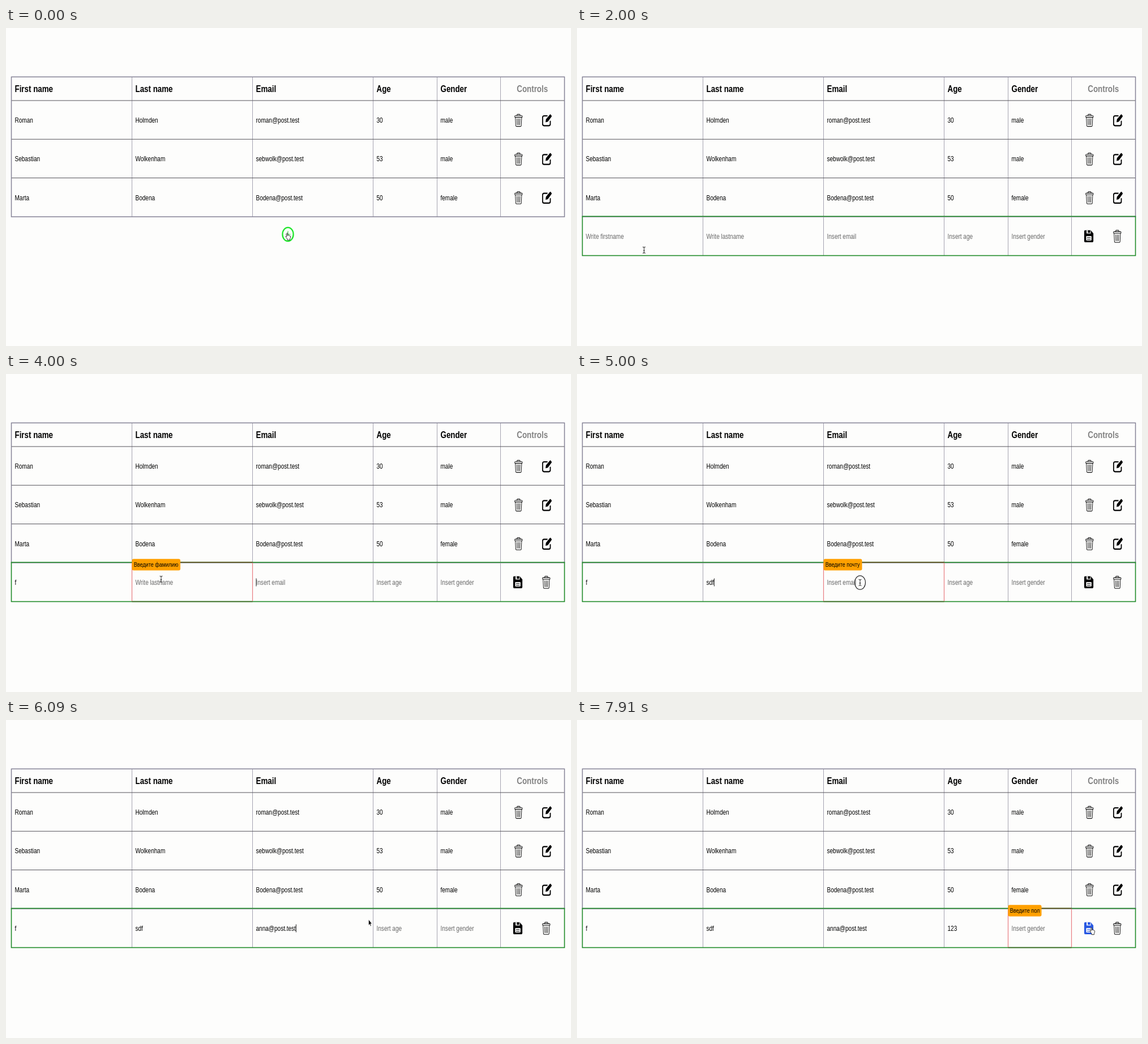
An HTML page that plays this animation: 998x561 px, repeating every 8000 ms.

```html
<!DOCTYPE html>
<html lang="en">
<head>
<meta charset="utf-8">
<title>Editable table</title>
<style>
html, body { margin: 0; width: 100%; height: 100%; overflow: hidden; background: #fdfdfc; }
svg { display: block; width: 998px; height: 561px; font: 12.4px "Liberation Sans", Arial, sans-serif; }
.head { font-size: 16.5px; font-weight: bold; }
.tip { font-size: 11.2px; }
.hint { fill: #686868; }
</style>
</head>
<body>
<svg id="stage" viewBox="0 0 998 561" xmlns="http://www.w3.org/2000/svg">
  <defs>
    <g id="trash" fill="none" stroke="#111" stroke-width="1.15">
      <path d="M-3.5-8.3v-1.2q0-1.2 1.2-1.2h4.6q1.2 0 1.2 1.2v1.2"/>
      <rect x="-8.2" y="-8.3" width="16.4" height="2.9" rx="1"/>
      <path d="M-6.9-5.4L-6.1 9q.1 1.6 1.7 1.6h8.8q1.6 0 1.7-1.6L6.9-5.4M-3.2-3.2L-2.8 8.2M0-3.2V8.2M3.2-3.2L2.8 8.2"/>
    </g>
    <g id="pen">
      <path d="M1.5-7.7H-6q-3.2 0-3.2 3.2V6.4q0 3.2 3.2 3.2H4.4q3.2 0 3.2-3.2V1" fill="none" stroke="#000" stroke-width="2.2"/>
      <path d="M-2.8 3.6l.9-5.2L6.6-10q1-1 2 0l1.6 1.7q1 1 0 2L2.3 2.6z"/>
    </g>
    <g id="save">
      <path d="M-8-10.5H4.4L10-4.8V8.4q0 2.2-2.2 2.2H-7.8q-2.2 0-2.2-2.2V-8.3q0-2.2 2-2.2z"/>
      <path d="M-4.8-10.6h2.5v4.5h5.6v-4.5h1.2v5.8h-9.3zM-4.7-.2h9.6q1 0 1 1v5.7q0 1-1 1h-9.6q-1 0-1-1V.8q0-1 1-1z" fill="#fdfdfc"/>
      <path d="M-3.6 1.8h7.4v1H-3.6zM-3.6 4.6h7.4v1H-3.6z"/>
    </g>
    <path id="ibeam" d="M-3-5.5q2.2 0 3 1.2.8-1.2 3-1.2M0-4.3V4.3M-3 5.5q2.2 0 3-1.2.8 1.2 3 1.2M-1.6.9h3.2" fill="none" stroke="#222" stroke-width="1.1"/>
    <path id="arrow" d="M0-5v10.2l2.4-2.1 1.6 3.6 1.7-.8-1.6-3.4h3.2z" fill="#000" stroke="#fff" stroke-width=".6"/>
    <path id="hand" d="M-2.6-3.2q0-1.3 1.1-1.3T-.4-3.2V.2l.5-.9q1.5-.4 1.9.8 1.4-.5 1.9.7 1.6-.3 1.7 1.2 0 2.6-1.4 4.2v1.9H-1.2V6.4L-4.8 2.3q-.5-1.4 1-1.3l1.2 1z" fill="#fff" stroke="#222" stroke-width="1"/>
  </defs>
  <g id="table"></g>
  <g id="plus"></g>
  <g id="row"></g>
  <g id="pointer"><ellipse id="ring" rx="9.5" ry="12.2" fill="none" stroke="#222" stroke-width="1.2"/><use id="cursor"/></g>
</svg>
<script>
const FPS = 11, LOOP = 8000, SQUEEZE = 0.81;
const $ = id => document.getElementById(id);
const at = (x, y) => `transform="translate(${x} ${y}) scale(${SQUEEZE} 1)"`;
const text = (x, y, s, extra = '') => `<text ${at(x, y)} ${extra}>${s}</text>`;
const icon = (id, x, y) => `<use href="#${id}" ${at(x, y)}/>`;
const line = (x1, y1, x2, y2, color, w = 1) =>
  `<path d="M${x1} ${y1}L${x2} ${y2}" stroke="${color}" stroke-width="${w}"/>`;
const show = (el, on) => el.setAttribute('visibility', on ? 'visible' : 'hidden');

const LEFT = 9.5, RIGHT = 986.5, TOP = 86.3, BOTTOM = 333, ROW_END = 401.5;
const edges = [LEFT, 222.5, 435.5, 648.5, 761.5, 873.5];
const textX = edges.map(x => x + 6);
const heads = ['First name', 'Last name', 'Email', 'Age', 'Gender'];
const people = [
  ['Roman', 'Holmden', 'roman@post.test', '30', 'male'],
  ['Sebastian', 'Wolkenham', 'sebwolk@post.test', '53', 'male'],
  ['Marta', 'Bodena', 'Bodena@post.test', '50', 'female']
];
const hints = ['Write firstname', 'Write lastname', 'Insert email', 'Insert age', 'Insert gender'];

// Field values: [step, field, value]
const typed = [
  [25, 0, 'f'], [49, 1, 's'], [50, 1, 'sd'], [51, 1, 'sdf'],
  [63, 2, 'anna@post.test'], [73, 3, '1'], [74, 3, '12'], [75, 3, '123']
];
// Focused field: [step, field]
const focus = [[12, 0], [33, 1], [40, 2], [46, 1], [56, 2], [71, 3], [79, 4], [86, -1]];
// Warnings: field, first step, end step, width, message
const tips = [
  [1, 40, 49, 85.5, 'Введите фамилию'],
  [2, 46, 63, 68, 'Введите почту'],
  [4, 86, 88, 59, 'Введите пол']
];
const clicks = [2, 12, 32, 39, 46, 54, 55, 70, 78, 85];
// Pointer path: step, x, y, shape
const path = [
  [0, 498, 366, 'hand'], [3, 498, 366, 'ibeam'], [5, 470, 367, 'ibeam'], [11, 114, 369, 'ibeam'],
  [16, 112, 371, 'ibeam'], [21, 118, 392, 'ibeam'], [26, 122, 390, 'ibeam'], [32, 238, 382, 'ibeam'],
  [34, 242, 382, 'ibeam'], [39, 466, 375, 'ibeam'], [41, 455, 372, 'ibeam'], [44, 274, 362, 'ibeam'],
  [46, 268, 365, 'ibeam'], [51, 272, 366, 'ibeam'], [54, 500, 368, 'ibeam'], [56, 500, 368, 'ibeam'],
  [60, 506, 388, 'ibeam'], [63, 508, 388, 'ibeam'], [67, 640.5, 357, 'arrow'], [68, 662, 361, 'ibeam'],
  [70, 690, 370, 'ibeam'], [75, 694, 370, 'ibeam'], [78, 810, 370, 'ibeam'], [81, 814, 370, 'ibeam'],
  [84, 904, 370, 'hand'], [87, 910, 370.5, 'hand']
];
const REST_ROW = 3;

function buildTable() {
  let s = '';
  heads.forEach((h, i) => s += text(textX[i], 113, h, 'class="head"'));
  s += text(929.7, 113, 'Controls', 'class="head" text-anchor="middle" fill="#828282"');
  people.forEach((p, r) => {
    const y = 162.7 + r * 68.3;
    p.forEach((v, i) => s += text(textX[i], y + 4.4, v));
    s += icon('trash', 905.3, y + .3) + icon('pen', 955.3, y);
  });
  edges.slice(1).forEach(x => s += line(x, TOP, x, BOTTOM, '#a5a3b1'));
  [128, 196.2, 264.5].forEach(y => s += line(LEFT, y, RIGHT, y, '#55535a', 1.1));
  s += `<rect x="${LEFT}" y="${TOP}" width="${RIGHT - LEFT}" height="${BOTTOM - TOP}" fill="none" stroke="#858296" stroke-width="1.5"/>`;
  $('table').innerHTML = s;
  $('plus').innerHTML = '<ellipse cx="498" cy="364" rx="9.6" ry="12.2" fill="none" stroke="#20e62c" stroke-width="2.3"/>' +
    line(493.5, 364, 502.5, 364, '#5fdc66', 1.3) + line(498, 358, 498, 370, '#5fdc66', 1.3);
}

function buildRow() {
  let s = '';
  edges.slice(1).forEach(x => s += line(x, 333, x, 401, '#a5a3b1'));
  s += `<rect x="${LEFT}" y="332.3" width="${RIGHT - LEFT}" height="${ROW_END - 332.3}" fill="none" stroke="#1f8b28" stroke-width="1.6"/>`;
  hints.forEach((h, i) => s += text(textX[i], 371.9, h, `id="field${i}"`));
  s += `<g id="disk">${icon('save', 904, 367.3)}</g>` + icon('trash', 954.3, 367.6);
  tips.forEach(([i, , , w, msg], n) => {
    const x = edges[i], end = edges[i + 1];
    s += `<g id="tip${n}">` + line(x, 333, x, 401, '#e87c80', 1.2) + line(end, 333, end, 401, '#e87c80', 1.2) +
      line(x, 332.3, end, 332.3, '#65501a', 1.6) + line(x, ROW_END, end, ROW_END, '#39651d', 1.5) +
      `<rect x="${x}" y="326.3" width="${w}" height="20.2" rx="3" fill="#ffa000"/>` +
      text(x + 3.2, 340.4, msg, 'class="tip"') + '</g>';
  });
  s += '<path id="caret" stroke="#222" stroke-width="1"/>';
  $('row').innerHTML = s;
}

const last = (list, step) => list.filter(e => e[0] <= step).pop();

function drawFields(step) {
  hints.forEach((h, i) => {
    const entry = last(typed.filter(e => e[1] === i), step), el = $('field' + i);
    el.textContent = entry ? entry[2] : h;
    el.setAttribute('class', entry ? '' : 'hint');
  });
  tips.forEach(([, from, to], n) => $('tip' + n).setAttribute('display', step >= from && step < to ? 'inline' : 'none'));
  $('disk').setAttribute('fill', step >= 84 ? '#2858e2' : '#000');

  const f = last(focus, step), caret = $('caret');
  let on = false;
  if (f && f[1] >= 0) {
    const entry = last(typed.filter(e => e[1] === f[1]), step);
    const since = Math.max(f[0], entry ? entry[0] : 0);
    on = (step - since) % 11 < 6;
    const w = entry ? $('field' + f[1]).getComputedTextLength() * SQUEEZE : 0;
    caret.setAttribute('d', `M${textX[f[1]] + w + .5} 360.5v14`);
  }
  caret.setAttribute('display', on ? 'inline' : 'none');
}

function drawPointer(step) {
  const i = path.filter(p => p[0] <= step).length - 1;
  const a = path[i], b = path[i + 1] || a;
  const u = b === a ? 0 : (step - a[0]) / (b[0] - a[0]);
  const e = u * u * (3 - 2 * u);
  const x = a[1] + (b[1] - a[1]) * e, y = a[2] + (b[2] - a[2]) * e;
  $('pointer').setAttribute('transform', `translate(${x} ${y})`);
  $('cursor').setAttribute('href', '#' + a[3]);
  $('cursor').setAttribute('transform', `scale(${SQUEEZE} 1)`);
  show($('ring'), clicks.includes(step));
}

function draw(ms) {
  const step = Math.floor((ms % LOOP) * FPS / 1000 + 0.05) % (LOOP * FPS / 1000);
  const open = step >= REST_ROW;
  $('plus').setAttribute('display', open ? 'none' : 'inline');
  $('row').setAttribute('display', open ? 'inline' : 'none');
  if (open) drawFields(step);
  drawPointer(step);
}

buildTable();
buildRow();
const start = performance.now();
function tick() {
  draw(performance.now() - start);
  requestAnimationFrame(tick);
}
tick();
</script>
</body>
</html>
```
